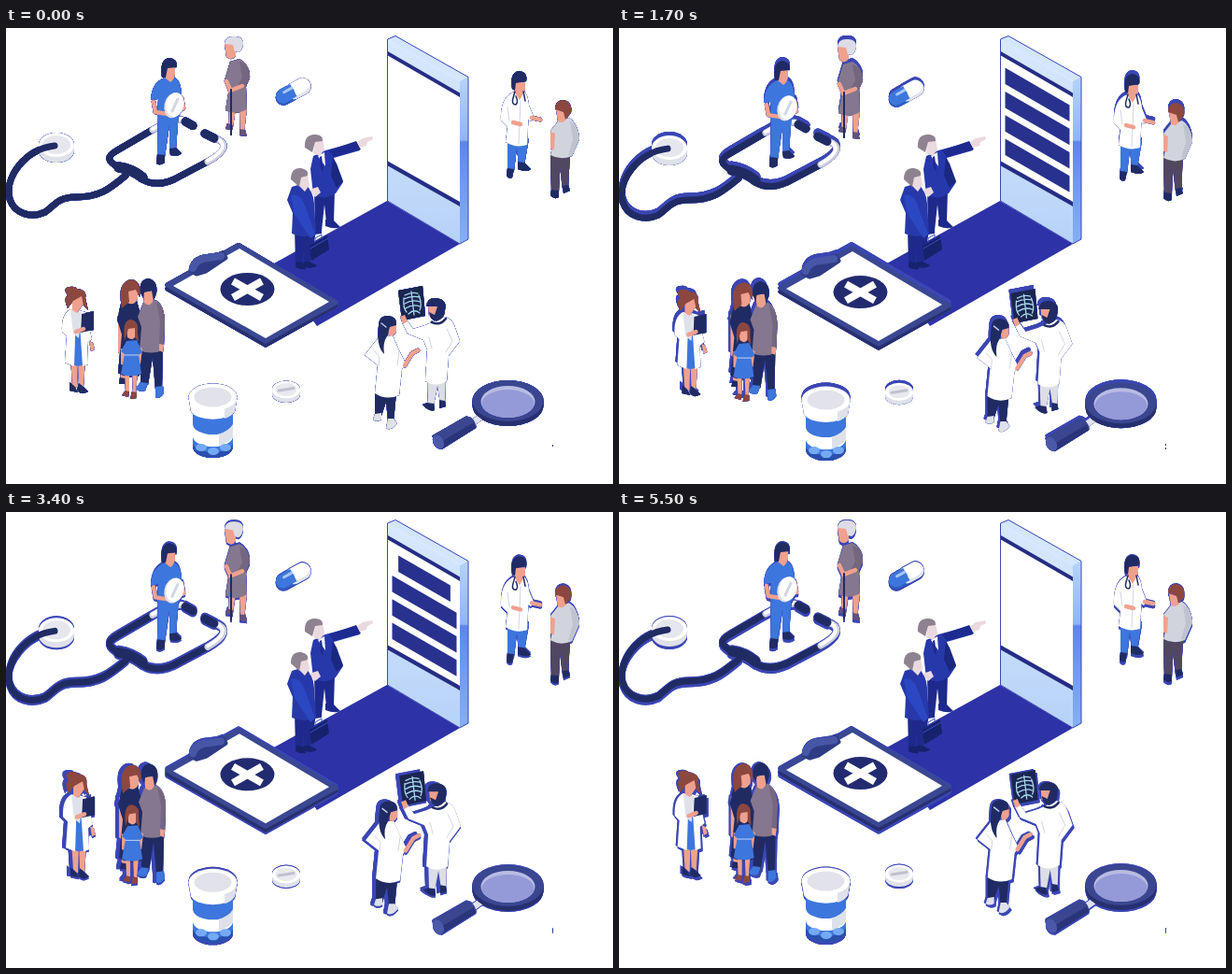
Animation of 650 by 488 pixels, one loop 5600 ms. Source, as an HTML page:

```html
<!DOCTYPE html>
<html lang="en">
<head>
<meta charset="utf-8">
<title>Online clinic</title>
<style>
html, body { margin: 0; width: 100%; height: 100%; overflow: hidden; background: #fff; }
svg { display: block; width: 100%; height: 100%; }
path, ellipse, rect { stroke-linecap: round; stroke-linejoin: round; }
.w { fill: #fff; } .g { fill: #dfe1ea; } .n { fill: #202b63; } .b { fill: #3d76dc; }
.s { fill: #efa18e; } .m { fill: #85778f; } .h { fill: #8c473f; } .d { fill: #2739aa; }
.k { fill: #1d2a8c; } .l { fill: none; stroke: #202b63; }
.ls { fill: none; stroke: #efa18e; stroke-width: 4.5; } .lg { fill: none; stroke: #d3d6e4; }
</style>
</head>
<body>
<svg viewBox="0 0 650 488" preserveAspectRatio="none">
<defs>
  <linearGradient id="side" x2="0" y2="1">
    <stop offset="0" stop-color="#b5d3fa"/><stop offset=".38" stop-color="#8fb5f6"/>
    <stop offset=".39" stop-color="#5b86e8"/><stop offset=".65" stop-color="#6f9bf0"/>
    <stop offset="1" stop-color="#86aff5"/>
  </linearGradient>
  <linearGradient id="front" x2="0" y2="1">
    <stop offset="0" stop-color="#d8e9fc"/><stop offset="1" stop-color="#b7d2f8"/>
  </linearGradient>
</defs>

<!-- walkway and phone -->
<path fill="#2d32a6" d="M408 185L486 231L333 319L285 253Z"/>
<path fill="url(#front)" d="M408 12L486 57V231L408 185Z"/>
<path fill="#d3e6fc" d="M408 12L417 8L495 52L486 57Z"/>
<path fill="url(#side)" d="M486 57L495 52V226L486 231Z"/>
<path class="w" d="M409 26L486 70V190L409 145Z"/>
<path fill="#252d85" d="M408 24.500L486 69.500V74L408 29ZM408 142L486 186V191L408 147Z"/>
<path fill="none" stroke="#3b46b4" stroke-width="1" d="M408.500 185V12L417 8.500L495 52.500V226L486 231L408.500 185"/>
<g id="bars" fill="#29318f"></g>

<!-- stethoscope -->
<g class="bob" data-y="3.500">
  <path class="g" d="M35 126V131A19 13 0 0 0 73 131V126Z"/>
  <ellipse class="w" cx="54" cy="125" rx="19" ry="13"/>
  <ellipse fill="#e6e6ee" cx="54" cy="125" rx="15" ry="10"/>
  <path class="l" stroke-width="7" d="M52 126C20 130 -2 160 4 183C9 199 27 204 42 197C52 190 56 181 74 181C100 181 110 173 128 158M122 150C108 142 107 138 119 131L155 110M146 162C158 169 169 167 180 162L214 144"/>
  <path fill="none" stroke="#ccd0de" stroke-width="7" d="M157 109Q175 98 188 98M216 143C236 132 238 123 224 118"/>
  <path fill="none" stroke="#fff" stroke-width="4" d="M157 108Q175 97 188 97M216 142C235 131 236 123 224 117"/>
  <path class="l" stroke-width="11" d="M121 149Q135 151 146 160"/>
  <path class="l" stroke-width="9" d="M192 100L200 104.500M213 113L223 118"/>
</g>

<!-- nurse with a tablet -->
<g class="bob" data-y="3.500">
  <path class="b" d="M163 88L162 138H170L175 104L175 130H182L185 88Z"/>
  <path class="n" d="M162 135L170 136V144Q165 148 161 145ZM175 129L182 128L188 134Q185 138 176 136Z"/>
  <path class="b" d="M170 53L180 53Q187 55 188 71L186 94Q175 99 162 94L163 76L155 77Q156 58 170 53Z"/>
  <path class="ls" d="M158 79L160 90L173 92M188 75L190 86"/>
  <path class="s" d="M171 42H181V50Q180 55 176 58L170 53Z"/>
  <path class="n" d="M167 53Q164 33 175 32Q184 33 183 42L173 43L171 53Z"/>
  <ellipse class="g" cx="179" cy="83" rx="9.500" ry="13.500" transform="rotate(12 179 83)"/>
  <ellipse class="w" cx="181" cy="82" rx="9.500" ry="13" transform="rotate(12 181 82)"/>
  <path class="lg" stroke-width="3" d="M178 89L184 76"/>
</g>

<!-- elderly woman -->
<g class="bob" data-y="3.500">
  <path class="s" d="M239 86H246L243 106H238ZM250 86H258L255 112H251Z"/>
  <path fill="#62537a" d="M237 102L243 104V109L235 108ZM250 108L256 109L258 116L250 115Z"/>
  <path class="m" d="M240 36L250 33Q260 38 261 52L257 63L258 87Q246 94 235 88L239 64L234 56Z"/>
  <path fill="#75667f" d="M250 36Q262 39 261 54L256 64L248 62L253 53Z"/>
  <path class="ls" stroke-width="3" d="M253 62L240 67M236 57L240 66"/>
  <path class="l" stroke-width="2" d="M241 66V114"/>
  <path class="s" d="M234 17H246V30Q242 36 236 31Z"/>
  <path fill="#dddce4" d="M234 17Q235 8 245 9Q254 9 254 17Q253 24 249 26L245 25L243 18Z"/>
</g>

<!-- capsule -->
<g class="bob" data-y="2.500">
  <g transform="rotate(-29 307 67)" fill="none" stroke-width="17">
    <path stroke="#2f5fc4" d="M295 68.500H305"/><path stroke="#e2e4ee" d="M308 68.500H319"/>
    <path stroke="#fff" stroke-width="15" d="M307 66.500H319"/>
    <path stroke="#3d76dc" stroke-width="15" d="M295 67H301"/>
    <rect x="299" y="59.500" width="9" height="15" fill="#3d76dc" stroke="none"/>
    <path stroke="#a8c6f7" stroke-width="3" d="M298 64H307"/>
  </g>
</g>

<!-- doctor and patient -->
<g class="bob" data-y="3.500">
  <path class="b" d="M537 118H560L555 147H549L547 128L544 153H537Z"/>
  <path class="n" d="M537 150L544 151L542 160Q538 162 536 158ZM548 143L555 144L562 151Q558 155 548 151Z"/>
  <path class="w" d="M542 69L554 67Q560 72 560 86L558 125Q546 129 535 122L537 106L530 99Q529 76 542 69Z"/>
  <path class="lg" stroke-width="1" d="M537 85L539 100M551 78L549 124"/>
  <path class="w" d="M556 73L565 95L562 100L554 94Z"/>
  <path class="ls" stroke-width="4" d="M563 96L572 98M543 101L551 103"/>
  <path class="s" d="M544 58H556V66Q553 72 550 77L544 68Z"/>
  <path class="n" d="M542 65Q539 48 549 46Q559 47 557 57L546 59L545 67Z"/>
  <path class="l" stroke-width="1.500" d="M545 68L543 75Q541 82 546 82Q549 79 546 73M554 68L556 78"/>
</g>
<g class="bob" data-y="3.500">
  <path fill="#514760" d="M583 133H604L602 172H596L593 148L592 176H584Z"/>
  <path class="n" d="M584 173L592 174V181Q587 184 583 179ZM596 169L602 168L604 174L597 177Z"/>
  <path fill="#d2d4dd" d="M591 100L603 96Q612 101 614 118L606 137Q594 142 583 136L587 120L583 110Z"/>
  <path fill="#bfc3d0" d="M604 100Q613 103 614 119L606 137L602 136L607 119Z"/>
  <path class="s" d="M583 111L588 113L587 130L583 129ZM589 87H600V97Q597 103 591 100Z"/>
  <path class="h" d="M588 87Q588 77 597 77Q607 79 605 91L599 98L597 90Z"/>
</g>

<!-- clipboard -->
<g class="bob" data-y="3.500">
  <path fill="#27306f" stroke="#27306f" stroke-width="5" d="M173 279L249 235.500L353 297L278 339Z"/>
  <path fill="#3a4792" stroke="#3a4792" stroke-width="5" d="M173 275L249 232.500L353 294L278 335Z"/>
  <path class="w" d="M179 276L250 236L346 293L278 332Z"/>
  <path fill="#2f3c85" stroke="#2f3c85" stroke-width="5" d="M198 260L203 249L222 245L232 241L235 246L214 260L204 263Z"/>
  <path fill="none" stroke="#4757a6" stroke-width="8" d="M200 257Q203 247 216 246L230 244"/>
  <ellipse fill="#232b70" cx="258.500" cy="279.500" rx="29" ry="17.500"/>
  <path fill="none" stroke="#fff" stroke-width="8" style="stroke-linecap:butt" d="M243 271L274 288.500M243 288.500L274 271"/>
</g>

<!-- businessmen -->
<path class="k" d="M330 174L352 174L351 207L343 208L341 189L338 217L331 216Z"/>
<path class="k" d="M342 205L351 206L358 213Q352 216 342 212ZM331 213L338 214V220L331 221Z"/>
<path class="d" d="M329 137L342 131L375 122L379 131L351 139L361 165L353 177Q340 185 329 178L326 151Z"/>
<path fill="#1b2880" d="M350 139L354 145L361 164L354 171L348 158Z"/>
<path class="w" d="M334 137L341 133L342 148Z"/>
<path class="k" d="M336 138L338 137L340 154L337 150Z"/>
<path fill="#1d2a90" d="M346 131L375 121L380 130L351 138Z"/>
<path fill="#ead9df" d="M376 122L382 118L392 116L393 119L387 122L386 126L379 128ZM331 121L339 119L341 130L336 137L329 134Z"/>
<path fill="#8f8290" d="M320 128Q319 113 332 114Q340 115 339 121L331 122L328 133Z"/>
<path class="k" d="M309 214L332 218L325 254L318 255L319 235L317 254H310Z"/>
<path fill="#17226d" d="M311 250L318 251L321 258Q315 259 310 256ZM319 250L325 250L333 254Q330 258 319 256Z"/>
<path class="d" d="M306 170L319 166Q329 173 330 188L332 220Q319 226 306 220L307 198L301 184Z"/>
<path fill="#2b48c2" d="M305 179Q312 177 318 185L331 221L326 225L309 199Z"/>
<path fill="#ead9df" d="M314 158L323 157L325 168L320 175L314 169ZM325 173L334 170L337 176L331 181Z"/>
<path fill="#8f8290" d="M305 162Q305 149 316 150Q325 152 323 158L316 160L314 170Z"/>
<path fill="#17226d" d="M325 233L344 222L346 237L327 249Z"/>
<path fill="none" stroke="#3850bc" d="M326 236L345 225M331 229L331 225L338 221V225"/>

<!-- woman doctor -->
<g class="bob" data-x="2" data-y="3.500">
  <path class="s" d="M69 352L77 352L76 385L71 383ZM77 352L85 353L83 384L78 382Z"/>
  <path class="n" d="M68 379L73 383L77 390L68 388ZM78 380L82 383L88 389Q80 394 76 387Z"/>
  <path class="b" d="M69 304H84L85 360Q76 364 68 359Z"/>
  <path class="w" d="M69 301L75 302L73 362L63 358L65 330L60 325Q59 306 69 301ZM78 302L85 304L92 333L87 337L88 360L82 362Z"/>
  <path class="g" d="M69 302L81 304L78 332L72 327Z"/>
  <path class="s" d="M71 286H83V295Q79 301 76 305L71 302ZM89 335L93 337L95 344L91 346Z"/>
  <path class="h" d="M66 300Q61 288 66 286Q60 278 68 277Q74 276 76 279Q87 280 85 289L88 302L83 297L81 287L72 292Z"/>
  <path class="n" d="M81 306L94 303V323L80 326Z"/>
  <path class="ls" stroke-width="3.500" d="M75 325L83 322"/>
</g>

<!-- family -->
<g class="bob" data-x="2" data-y="3.500">
  <path class="s" d="M122 360H128L128 378H123ZM120 304L125 306L124 350L120 347Z"/>
  <path class="n" d="M123 295L140 292L146 314L143 372Q130 376 120 369L124 328L119 312ZM122 374L128 375V381H121Z"/>
  <path class="s" d="M129 280H141V290Q137 298 130 294Z"/>
  <path class="h" d="M124 300Q121 283 124 277Q129 267 138 270Q146 275 143 288L139 280L131 282L132 293Z"/>
  <path class="n" d="M144 340H168L167 387H160L157 352L152 382H144Z"/>
  <path class="b" d="M144 379L152 380L149 388Q143 390 139 386ZM160 384L168 383L169 391Q164 398 160 395Z"/>
  <path class="m" d="M147 294L160 291Q169 295 170 314L168 345Q155 350 143 345L145 320L141 309Z"/>
  <path fill="#75677f" d="M161 293Q170 298 170 316L169 340L164 338L165 314Z"/>
  <path class="s" d="M147 282H158V291Q154 300 148 294ZM164 338L169 339L168 347L164 345Z"/>
  <path class="n" d="M144 283Q142 270 152 268Q163 270 161 284L158 292L156 281L148 283L147 289Z"/>
  <path class="s" d="M127 366H132L132 389H128ZM135 366H141L139 391H136ZM123 343L127 344L127 361L123 360ZM142 341L146 343L144 360L141 358Z"/>
  <path class="h" d="M128 388L132 389L131 395L124 393ZM135 389L140 390L140 396L133 397Z"/>
  <path class="b" d="M129 335L140 334L146 347L142 350L145 370Q133 375 123 370L127 349L123 346Z"/>
  <path fill="none" stroke="#bdd4fa" stroke-width="1" d="M127 350H142"/>
  <path class="s" d="M129 320H139V329Q136 336 130 331Z"/>
  <path class="h" d="M127 335Q124 312 134 312Q143 314 141 325L142 336L138 331L138 321L131 322Z"/>
</g>

<!-- medicine bottle -->
<g class="bob" data-y="3.500">
  <path class="b" d="M200 408H243V448A21.500 12 0 0 1 200 448Z"/>
  <path fill="#2a4fae" d="M200 444A21.500 10 0 0 0 243 444V448A21.500 12 0 0 1 200 448Z"/>
  <path class="w" d="M200 424A21.500 11 0 0 0 243 424V437A21.500 11 0 0 1 200 437Z"/>
  <path class="g" d="M228 434.500Q239 431 243 424V437Q239 444 228 447Z"/>
  <g fill="#74aaf5"><ellipse cx="209" cy="449" rx="6" ry="4"/><ellipse cx="222" cy="453" rx="6" ry="4"/><ellipse cx="235" cy="449" rx="6" ry="4"/></g>
  <path class="w" d="M195.500 395H247.500L245 410A24 11 0 0 1 198 410Z"/>
  <path class="g" d="M234 404L247.500 395L245 410Q241 416 234 418Z"/>
  <ellipse class="w" cx="221.500" cy="395" rx="26" ry="14.500"/>
  <ellipse fill="#e1e2ea" cx="221.500" cy="395" rx="20" ry="10.500"/>
</g>

<!-- tablet -->
<g class="bob" data-y="2.500">
  <path class="g" d="M285 387V392A15 9 0 0 0 315 392V387Z"/>
  <ellipse class="w" cx="300" cy="387" rx="15" ry="9.500"/>
  <ellipse fill="#e9e9f0" cx="300" cy="387" rx="11.500" ry="7"/>
  <path fill="none" stroke="#bfc1cd" stroke-width="3" d="M292 388L308 385.500"/>
</g>

<!-- doctors with an x-ray -->
<g class="bob" data-x="2" data-y="3.500">
  <path fill="#1b2550" d="M420 281L446 276L449 308L424 313Z"/>
  <path fill="none" stroke="#a9d8ea" stroke-width="1.300" d="M434 282L437 307M427 286Q434 282 441 284M426 290Q434 286 443 288M427 295Q435 290 443 293M428 300Q436 295 443 298M431 306Q437 300 443 305M426 289Q425 300 429 304M442 286Q446 296 443 302"/>
  <path fill="#dcdde6" d="M451 370H471L470 402H465L462 383L458 404H452Z"/>
  <path class="n" d="M451 401L458 402L459 409Q453 411 446 403ZM464 398L470 399L471 405L464 407Z"/>
  <path class="w" d="M449 318L469 309Q477 310 480 318L486 335L474 351L472 378Q460 385 449 378L451 344L447 334L430 327L424 315L429 312L436 322Z"/>
  <path class="lg" stroke-width="1" d="M472 322L478 335L471 347M453 331L456 343"/>
  <path class="s" d="M422 309L427 307L430 314L425 317ZM452 296L463 294L462 309L453 308Z"/>
  <path class="n" d="M450 298Q451 288 461 289Q473 291 470 302Q470 311 461 314Q454 312 453 304L459 307L462 298Z"/>
  <path class="l" stroke-width="2.500" d="M456 315Q465 319 471 311"/>
  <path class="n" d="M395 390H418L415 421H409L407 400L402 415H395Z"/>
  <path class="g" d="M395 413L402 412V419Q397 422 393 419ZM409 418L415 418L419 423Q412 432 407 428Z"/>
  <path class="w" d="M399 331L414 329L421 345L428 359L424 365L421 393Q407 399 395 391L398 361L384 350Z"/>
  <path class="lg" stroke-width="1" d="M394 345L400 352L399 362M421 346L419 361"/>
  <path class="ls" stroke-width="4" d="M427 361L435 348L441 345"/>
  <path class="s" d="M408 314H418V325Q415 331 410 329Z"/>
  <path class="n" d="M399 319Q399 308 409 308Q419 309 418 318L411 320L408 330Q403 337 405 349Q396 340 399 319Z"/>
  <path fill="none" stroke="#b9cbee" stroke-width="1.500" d="M402 316L407 320"/>
</g>

<!-- magnifier -->
<g class="bob" data-y="2.500">
  <path fill="none" stroke="#e1e3ed" stroke-width="7" d="M499 423L513 413"/>
  <path fill="#27306f" d="M499.500 399V404A38 22 0 0 0 575.500 404V399Z"/>
  <ellipse fill="#3a4690" cx="537.500" cy="399" rx="38" ry="22"/>
  <ellipse fill="#b9bce2" cx="537.500" cy="400" rx="29" ry="17"/>
  <ellipse fill="#9499d8" cx="537.500" cy="402" rx="28" ry="15"/>
  <path fill="#3a4690" stroke="#3a4690" stroke-width="3" d="M458 437L493 417Q501 418 502 427L467 449Z"/>
  <path fill="#29347a" d="M466 451L503 428L501 422L464 444Z"/>
  <ellipse fill="#4b59a8" cx="463" cy="443" rx="5.500" ry="8" transform="rotate(-28 463 443)"/>
</g>
<g class="bob" data-y="3.500"><rect class="n" x="585" y="446" width="1" height="1.500"/></g>
</svg>

<script>
const LOOP = 5600, STEP = 100, EDGE = '#3b46b4';
const clamp = v => Math.max(0, Math.min(1, v));
const turn = (t, period) => t / period * 2 * Math.PI;

const bars = [0, 1, 2, 3].map(() =>
  document.getElementById('bars').appendChild(
    document.createElementNS('http://www.w3.org/2000/svg', 'path')));
const items = [...document.querySelectorAll('.bob')].map(el => ({
  el, ax: +el.dataset.x || 0, ay: +el.dataset.y
}));

const swayX = t => -Math.sin(turn(t, LOOP / 1.5));
const swayY = t => (1 - Math.cos(turn(t, LOOP / 2))) / 2;

// Range travelled since the loop began: the blue edge fills it.
function range(fn, t) {
  let lo = 0, hi = 0;
  for (let s = 0; s <= t; s += STEP) {
    lo = Math.min(lo, fn(s));
    hi = Math.max(hi, fn(s));
  }
  return [lo, hi];
}

function drawBar(bar, i, t) {
  const grow = clamp((t - 58 - i * 350) / 350);
  const shrink = clamp((t - 3333 - i * 350) / 350);
  const half = 34.5 * (grow - shrink);
  const y = 62.5 + i * 25.3, dy = half * 0.577;
  bar.setAttribute('d', half > 0
    ? `M${448 - half} ${y - dy}L${448 + half} ${y + dy}v17.500L${448 - half} ${y - dy + 17.5}Z`
    : '');
}

function draw(t) {
  bars.forEach((bar, i) => drawBar(bar, i, t));
  const x = swayX(t), y = swayY(t);
  const [x0, x1] = range(swayX, t), [y0, y1] = range(swayY, t);
  const shadow = (dx, dy, blur = 0) => `drop-shadow(${dx}px ${dy}px ${blur}px ${EDGE})`;
  for (const { el, ax, ay } of items) {
    el.setAttribute('transform', `translate(${x * ax} ${y * ay})`);
    el.style.filter = shadow(0, 0, 0.6)
      + shadow((x0 - x) * ax, (y0 - y) * ay)
      + shadow((x1 - x) * ax, (y1 - y) * ay);
  }
}

const start = performance.now();
let shown = -1;
function tick() {
  const t = Math.floor((performance.now() - start) % LOOP / STEP) * STEP;
  if (t !== shown) draw(shown = t);
  requestAnimationFrame(tick);
}
tick();
</script>
</body>
</html>
```
